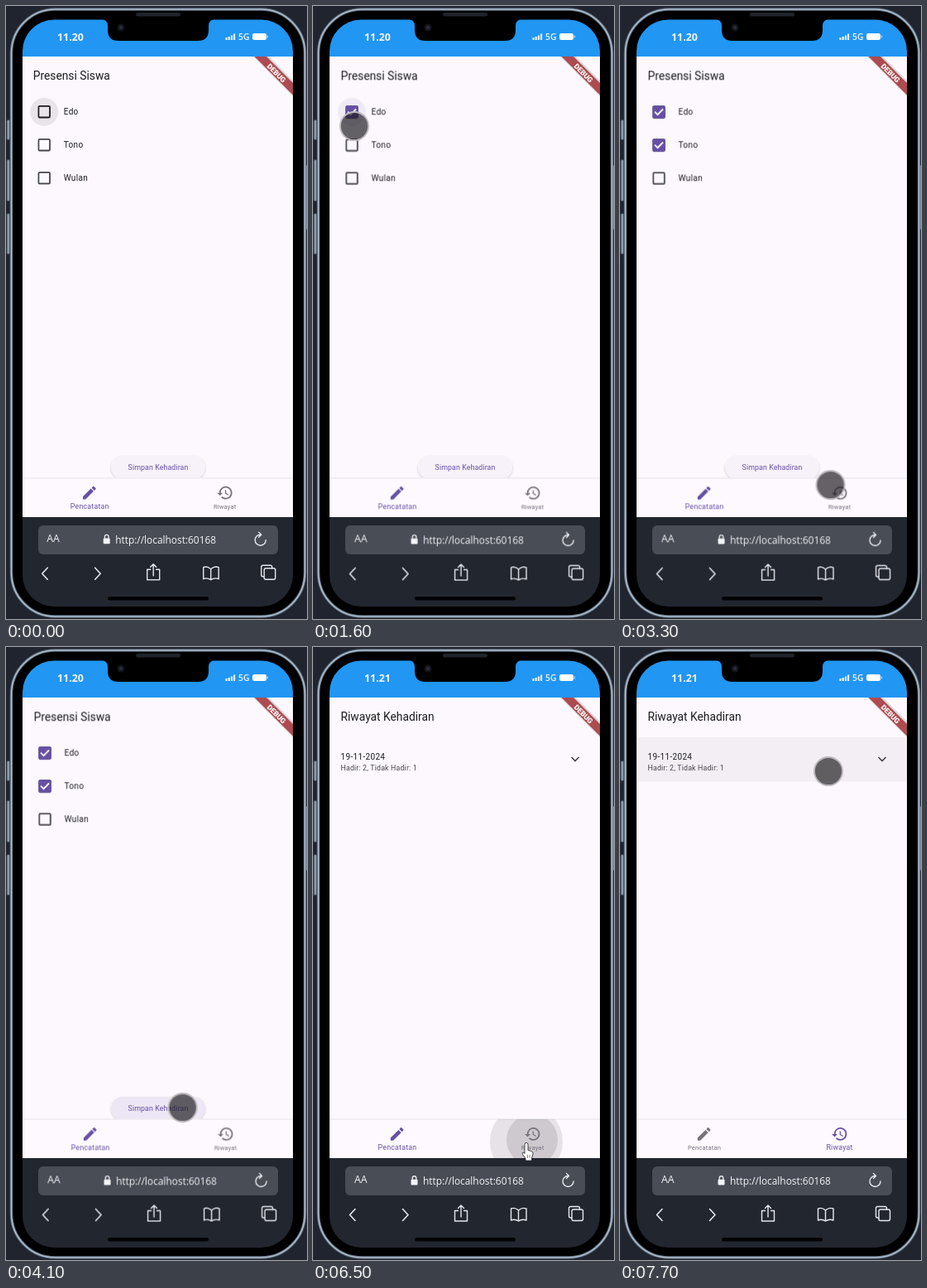
These frames come from a looping animation (364 px wide and 740 px high, 8 s). An HTML page:

```html
<!DOCTYPE html>
<html lang="id">
<head>
<meta charset="utf-8">
<title>Presensi Siswa</title>
<style>
html, body { margin: 0; width: 100%; height: 100%; overflow: hidden; background: #20242e; }
svg { display: block; width: 364px; height: 740px; }
text { font-family: Roboto, sans-serif; fill: #1d1b20; }
.ui { font-family: "Open Sans", sans-serif; fill: #f3f5f8; }
.title { font-size: 13.8px; }
.item { font-size: 10.05px; letter-spacing: .31px; }
.sub { font-size: 8.82px; letter-spacing: .16px; fill: #49454f; }
.glyph { fill: none; stroke: #e6e9ee; stroke-width: 1.4; stroke-linecap: round; stroke-linejoin: round; }
.nav text { fill: inherit; font-size: inherit; letter-spacing: .025em; text-anchor: middle; }

/* Every track shares one 8 s loop; 1.25% is 100 ms. */
.anim { animation: 8s linear infinite; }
.step { animation: 8s step-end infinite; }

.settle { animation-name: settle; }
@keyframes settle { 0%, 1.25% { transform: translate(-.8px, -.3px); } 8.75%, 100% { transform: none; } }

#early { animation-name: early; }
@keyframes early { 0% { opacity: 1; } 61.25%, 100% { opacity: 0; } }
#late { animation-name: late; }
@keyframes late { 0% { opacity: 0; } 61.25%, 100% { opacity: 1; } }

#record { animation-name: record; }
@keyframes record { 0% { opacity: 1; } 80%, 100% { opacity: 0; } }
#history { animation-name: history; }
@keyframes history { 0% { opacity: 0; } 80%, 100% { opacity: 1; } }

.tick { opacity: 0; }
#tick1 { animation-name: tick1; }
@keyframes tick1 { 0%, 16.25% { opacity: 0; } 17.5%, 57.5% { opacity: 1; } 59.5%, 100% { opacity: 0; } }
#tick2 { animation-name: tick2; }
@keyframes tick2 { 0%, 30.5% { opacity: 0; } 32%, 57.5% { opacity: 1; } 59.5%, 100% { opacity: 0; } }

.halo { fill: #1d1b20; opacity: 0; }
#halo1 { animation-name: halo1; }
@keyframes halo1 {
  0%, 16.25% { opacity: .09; fill: #1d1b20; }
  18%, 22.5% { opacity: .08; fill: #6750a4; }
  25%, 100% { opacity: 0; fill: #6750a4; }
}
#halo2 { animation-name: halo2; }
@keyframes halo2 {
  0%, 24% { opacity: 0; fill: #1d1b20; }
  26.25%, 30.5% { opacity: .08; fill: #1d1b20; }
  32%, 35% { opacity: .07; fill: #6750a4; }
  37.5%, 100% { opacity: 0; fill: #6750a4; }
}
#box1 { animation-name: outline; }
@keyframes outline { 0%, 16.25% { stroke: #1d1b20; } 25%, 100% { stroke: #49454f; } }

#hover { animation-name: hover; }
@keyframes hover { 0%, 47% { opacity: 0; } 48.75%, 70% { opacity: .07; } 72%, 100% { opacity: 0; } }
#press { animation-name: press; }
@keyframes press {
  0%, 56.25% { r: 10px; opacity: 0; }
  57.5% { r: 30px; opacity: .1; }
  61.25% { r: 100px; opacity: .1; }
  65%, 100% { r: 100px; opacity: 0; }
}

#splash { animation-name: splash; }
@keyframes splash {
  0%, 78% { r: 8px; opacity: 0; }
  78.75% { r: 18px; opacity: .1; }
  81.25% { r: 44px; opacity: .1; }
  86.25%, 100% { r: 75px; opacity: 0; }
}
#glow { animation-name: glow; }
@keyframes glow { 0%, 78% { opacity: 0; } 79.5%, 82.5% { opacity: .12; } 86.25%, 100% { opacity: 0; } }

#tab1 { animation-name: leave; }
#tab2 { animation-name: enter; }
@keyframes leave { 0%, 82.5% { fill: #6750a4; font-size: 8.82px; } 86.25%, 100% { fill: #77717c; font-size: 7.56px; } }
@keyframes enter { 0%, 82.5% { fill: #77717c; font-size: 7.56px; } 86.25%, 100% { fill: #6750a4; font-size: 8.82px; } }

#tile { animation-name: tile; }
@keyframes tile { 0%, 92.5% { opacity: 0; } 95%, 100% { opacity: .045; } }

#touch { animation-name: travel; }
@keyframes travel {
  0%, 22.5% { transform: translate(50px, 145px); }
  26.25%, 35% { transform: translate(45px, 173px); }
  41.25% { transform: translate(255px, 578px); }
  42.5%, 46.25% { transform: translate(209px, 594px); }
  48.75%, 70% { transform: translate(213.6px, 556px); }
  72.5%, 88.75% { transform: translate(261px, 604px); }
  93.75%, 100% { transform: translate(252px, 150px); }
}
#dot { animation-name: dot; }
@keyframes dot { 0% { opacity: 0; } 16.25% { opacity: 1; } 78.75% { opacity: 0; } 90%, 100% { opacity: 1; } }
#hand { animation-name: hand; }
@keyframes hand {
  0% { opacity: 0; transform: translate(54px, 130px); }
  11.25% { opacity: 1; transform: translate(54px, 130px); }
  13.75% { opacity: 0; transform: translate(258px, 599px); }
  78.75% { opacity: 1; transform: translate(258px, 599px); }
  90%, 100% { opacity: 0; transform: translate(258px, 599px); }
}
</style>
</head>
<body>
<svg viewBox="0 0 364 740">
  <defs>
    <clipPath id="screen"><rect x="20" y="16.500" width="327" height="708.500" rx="38"/></clipPath>
    <clipPath id="page"><rect x="20" y="61" width="327" height="556"/></clipPath>
    <clipPath id="bar"><rect x="20" y="570" width="327" height="47"/></clipPath>
    <clipPath id="pill"><rect x="127" y="543" width="114" height="28" rx="14"/></clipPath>
    <filter id="soft" x="-20%" y="-40%" width="140%" height="180%">
      <feDropShadow dx="0" dy="1" stdDeviation="1" flood-opacity=".22"/>
    </filter>
    <rect id="box" x="-6.8" y="-6.8" width="13.6" height="13.6" rx="1.3" fill="none" stroke-width="1.8"/>
    <g id="ticked">
      <rect x="-7.7" y="-7.7" width="15.4" height="15.4" rx="1.8" fill="#6750a4"/>
      <path d="M-5 -.4L-1.5 3.1L5 -3.5" fill="none" stroke="#fff" stroke-width="1.8"/>
    </g>
  </defs>

  <rect width="364" height="740" fill="#20242e"/>

  <g fill="#8c9bab" stroke="#414c59">
    <rect x="1" y="137.500" width="3.500" height="24" rx="1.500"/>
    <rect x="1" y="185.500" width="3.500" height="50" rx="1.500"/>
    <rect x="1" y="250.500" width="3.500" height="49" rx="1.500"/>
    <rect x="361.500" y="192" width="3" height="78" rx="1.500"/>
  </g>
  <rect x="6.500" y="4" width="355" height="733" rx="53" fill="#000" stroke="#5c6978" stroke-width="3.500"/>
  <rect x="6.500" y="4" width="355" height="733" rx="53" fill="none" stroke="#aebfd0" stroke-width="1.500"/>
  <rect x="157" y="8" width="54" height="4.500" rx="2.200" fill="#20242a"/>

  <g clip-path="url(#screen)">
    <rect x="20" y="16" width="327" height="46" fill="#2196f3"/>
    <rect x="20" y="61" width="327" height="556" fill="#fcf8fd"/>
    <rect x="20" y="617" width="327" height="110" fill="#22262f"/>
  </g>

  <path d="M115 15.500Q123 16.500 123 24V29Q123 42 136 42H232Q245 42 245 29V24Q245 16.500 253 15.500Z" fill="#000"/>
  <circle cx="139" cy="26" r="4.500" fill="#11151b"/>
  <circle cx="139" cy="26" r="2.200" fill="#262d38"/>
  <g font-size="12.4" font-weight="700">
    <text id="early" class="ui step" x="62" y="42.300">11.20</text>
    <text id="late" class="ui step" x="62" y="42.300">11.21</text>
  </g>
  <path d="M266.500 41V38M269.700 41V37M272.900 41V35.500M276.100 41V33.500" stroke="#fff" stroke-width="2"/>
  <text class="ui" x="281" y="41" font-size="10.3" font-weight="600">5G</text>
  <rect x="298" y="33" width="17" height="8" rx="2.200" fill="#fff"/>
  <path d="M316.300 35.500V38.500" stroke="#d5eaff"/>

  <g clip-path="url(#page)">
    <g id="record" class="step">
      <g class="anim settle">
        <text class="title" x="33.500" y="89">Presensi Siswa</text>
        <circle id="halo1" class="halo anim" cx="47" cy="128" r="17"/>
        <circle id="halo2" class="halo anim" cx="47" cy="168" r="17"/>
        <g stroke="#49454f">
          <g id="box1" class="anim"><use href="#box" x="47" y="128"/></g>
          <use href="#box" x="47" y="168"/>
          <use href="#box" x="47" y="208"/>
        </g>
        <g id="tick1" class="tick anim"><use href="#ticked" x="47" y="128"/></g>
        <g id="tick2" class="tick anim"><use href="#ticked" x="47" y="168"/></g>
        <text class="item" x="70.500" y="131.500">Edo</text>
        <text class="item" x="70.500" y="171.500">Tono</text>
        <text class="item" x="70.500" y="211.800">Wulan</text>
      </g>
      <rect x="127" y="543" width="114" height="28" rx="14" fill="#f7f2fa" filter="url(#soft)"/>
      <g clip-path="url(#pill)" fill="#6750a4">
        <rect id="hover" class="anim" x="127" y="543" width="114" height="28" opacity="0"/>
        <circle id="press" class="anim" cx="213" cy="556" r="10" opacity="0"/>
      </g>
      <text x="184" y="560.300" text-anchor="middle" font-size="8.82" letter-spacing=".1" style="fill:#6750a4">Simpan Kehadiran</text>
    </g>

    <g id="history" class="step" opacity="0">
      <text class="title" x="33.500" y="89">Riwayat Kehadiran</text>
      <rect id="tile" class="anim" x="20" y="109" width="327" height="53.500" fill="#1d1b20" opacity="0"/>
      <text class="item" x="33.500" y="135.600">19-11-2024</text>
      <text class="sub" x="33.500" y="148.800">Hadir: 2, Tidak Hadir: 1</text>
      <path d="M312.500 133L317 137.500L321.500 133" fill="none" stroke="#49454f" stroke-width="1.700"/>
    </g>

    <rect x="20" y="570" width="327" height="47" fill="#fdf9fe"/>
    <path d="M20 570H347" stroke="#eeeaf0" stroke-width="1.500"/>
    <g clip-path="url(#bar)" fill="#1d1b20">
      <circle id="splash" class="anim" cx="258" cy="597" r="8" opacity="0"/>
      <circle id="glow" class="anim" cx="265" cy="595" r="31" opacity="0"/>
    </g>
    <g class="nav anim settle">
      <g id="tab1" class="anim" fill="#6750a4">
        <path transform="translate(91.200 577.500) scale(.87)" d="M3 17.250V21h3.750L17.810 9.940l-3.750-3.750zM20.710 7.040a1 1 0 0 0 0-1.410l-2.340-2.340a1 1 0 0 0-1.410 0l-1.830 1.830 3.750 3.750z"/>
        <text x="102" y="607.200">Pencatatan</text>
      </g>
      <g id="tab2" class="anim" fill="#77717c">
        <path transform="translate(255.200 577.500) scale(.87)" d="M13 3a9 9 0 0 0-9 9H1l3.960 4L9 12H6a7 7 0 1 1 2.060 4.940l-1.420 1.420A9 9 0 1 0 13 3zm-1 5v5l4.280 2.540.720-1.210-3.500-2.080V8z"/>
        <text x="265.500" y="607.200">Riwayat</text>
      </g>
    </g>

    <path d="M299 61H318L347 90V109Z" fill="#000" opacity=".13"/>
    <path d="M300.500 61H315L347 93V107.500Z" fill="#ad4b50"/>
    <text transform="translate(327 81) rotate(45)" y="3" text-anchor="middle" font-size="8.8" font-weight="800" style="fill:#fff">DEBUG</text>
  </g>

  <rect x="39" y="627" width="290" height="35" rx="6" fill="#494d55"/>
  <g class="anim settle">
    <text class="ui" x="50" y="647" font-size="12.3">AA</text>
    <rect x="118.500" y="642.800" width="8" height="6.700" rx="1" fill="#f3f5f8"/>
    <path class="glyph" d="M120.200 642.500V641A2.300 2.300 0 0 1 124.800 641V642.500"/>
    <text class="ui" x="133" y="649" font-size="11.9">http://localhost:60168</text>
    <g class="glyph">
      <path d="M308.500 638.500A6.500 6.500 0 1 0 315 645M306.500 635.500L309.500 638.500L306.500 641.500"/>
      <path stroke-width="1.600" d="M51 678.500L44.500 685.500L51 692.500M108.500 678.500L115 685.500L108.500 692.500"/>
      <path d="M175.500 680.500H171.500V693H186.500V680.500H182.500M179 688V674M175.500 677.500L179 674L182.500 677.500"/>
      <path d="M248.500 680Q244 676 239.500 678V692Q244 690 248.500 693Q253 690 258 692V678Q253 676 248.500 680V693"/>
      <path d="M313 689H311.500Q309.500 689 309.500 687V677.500Q309.500 675.500 311.500 675.500H320.500Q322.500 675.500 322.500 677.500V679"/>
      <rect x="313" y="679" width="13.500" height="13.500" rx="2"/>
    </g>
  </g>
  <rect x="123" y="713" width="122" height="4.500" rx="2.200" fill="#020305"/>

  <g id="touch" class="anim">
    <g id="dot" class="step">
      <circle r="17.300" fill="#1c1a1e" fill-opacity=".68"/>
      <circle r="17" fill="none" stroke="#bbb7bc" stroke-width="1.800"/>
    </g>
  </g>
  <g id="hand" class="step" opacity="0">
    <path d="M-2 1.500A2 2 0 0 1 2 1.500V8.500L6 9.500Q8.500 10.300 8 13L6.500 18V21H-1V18.500L-4.500 13.500Q-5.500 11 -3 11.200L-2 12.500Z" fill="#fff" stroke="#333" stroke-width=".9" stroke-linejoin="round"/>
    <path d="M1.500 14V18M4 14V18" stroke="#555" stroke-width=".7"/>
  </g>
</svg>
</body>
</html>
```
